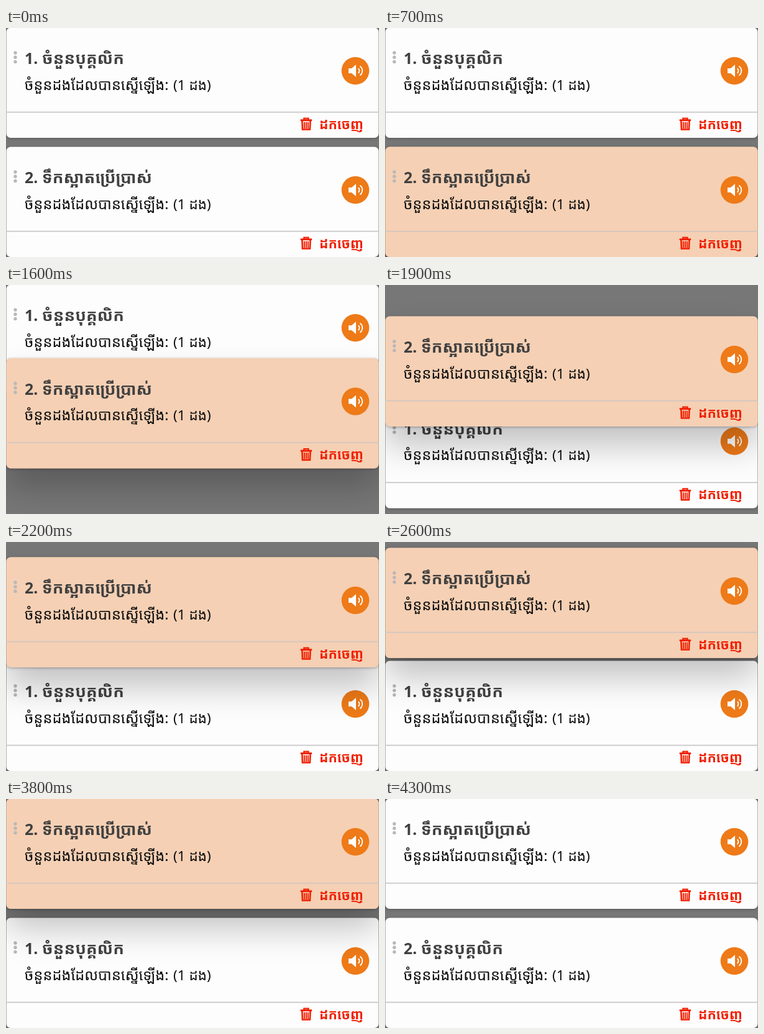
Animation, 600 px wide and 369 px high, one loop 4.4 s. Source, as an HTML page with a canvas:

```html
<!DOCTYPE html>
<html lang="km">
<head>
<meta charset="utf-8">
<title>Reorder cards</title>
<style>
  html, body { margin: 0; width: 100%; height: 100%; overflow: hidden; background: #777; }
  canvas { display: block; width: 600px; height: 369px; }
</style>
</head>
<body>
<canvas id="stage"></canvas>
<script>
const W = 600, H = 369, LOOP = 4400, STEP = 100;
const CARD_H = 177, SLOT = 192;
const LIFT = 700, SWAP = 1722, SWAP_TIME = 250, DROP = 3900;
const STAFF = 'ចំនួនបុគ្គលិក', WATER = 'ទឹកស្អាតប្រើប្រាស់';
const FONT = '"Noto Sans", "Noto Sans Khmer", sans-serif';
const RED = '#f01f00', ORANGE = '#ee7a18', DARK = '#404040', INK = '#0e0e0e';

// Pointer path of the dragged card: [time, top edge]
const path = [[1150, 192], [1400, 165], [1720, 88], [1900, 51], [2200, 25], [2600, 10], [3200, 0]];

const canvas = document.getElementById('stage');
const ctx = canvas.getContext('2d');
const dpr = window.devicePixelRatio || 1;
canvas.width = Math.round(W * dpr);
canvas.height = Math.round(H * dpr);

function slopeAt(i) {
  if (i === 0 || i === path.length - 1) return 0;
  const [a, b, c] = [path[i - 1], path[i], path[i + 1]];
  const before = (b[1] - a[1]) / (b[0] - a[0]);
  const after = (c[1] - b[1]) / (c[0] - b[0]);
  return 2 * before * after / (before + after);
}

function dragY(t) {
  if (t <= path[0][0]) return path[0][1];
  const i = path.findIndex(p => p[0] >= t);
  if (i < 0) return path[path.length - 1][1];
  const [t0, y0] = path[i - 1], [t1, y1] = path[i];
  const d = t1 - t0, u = (t - t0) / d, u2 = u * u, u3 = u2 * u;
  return y0 * (2 * u3 - 3 * u2 + 1) + y1 * (3 * u2 - 2 * u3)
    + d * slopeAt(i - 1) * (u3 - 2 * u2 + u) + d * slopeAt(i) * (u3 - u2);
}

// cubic-bezier(0, 0, .2, 1)
function easeOut(x) {
  if (x <= 0) return 0;
  if (x >= 1) return 1;
  let lo = 0, hi = 1;
  for (let i = 0; i < 24; i++) {
    const s = (lo + hi) / 2;
    if (0.6 * (1 - s) * s * s + s * s * s < x) lo = s; else hi = s;
  }
  return 3 * (1 - lo) * lo * lo + lo * lo * lo;
}

function text(str, x, y, size, color, weight = 400) {
  ctx.font = `${weight} ${size}px ${FONT}`;
  ctx.fillStyle = color;
  ctx.fillText(str, x, y);
}

function disc(x, y, r, color) {
  ctx.fillStyle = color;
  ctx.beginPath();
  ctx.arc(x, y, r, 0, Math.PI * 2);
  ctx.fill();
}

function panel(color, shadow, offset, blur) {
  ctx.save();
  ctx.shadowColor = shadow;
  ctx.shadowOffsetY = offset * dpr;
  ctx.shadowBlur = blur * dpr;
  ctx.fillStyle = color;
  ctx.beginPath();
  ctx.roundRect(0.5, -0.5, W - 1, CARD_H + 0.5, 7);
  ctx.fill();
  ctx.restore();
}

function speaker() {
  disc(562, 69, 22.3, ORANGE);
  ctx.fillStyle = ctx.strokeStyle = '#fff';
  ctx.beginPath();
  ctx.moveTo(551, 65);
  for (const [x, y] of [[556, 65], [563, 59], [563, 79], [556, 73], [551, 73]]) ctx.lineTo(x, y);
  ctx.fill();
  ctx.lineWidth = 1.9;
  for (const r of [4.5, 9.3]) {
    ctx.beginPath();
    ctx.arc(564, 69, r, -0.95, 0.95);
    ctx.stroke();
  }
}

function trash() {
  ctx.strokeStyle = ctx.fillStyle = RED;
  ctx.lineWidth = 2.2;
  ctx.fillRect(473.7, 147.2, 18.4, 2.8);
  ctx.strokeRect(479.3, 145.6, 7.2, 3);
  ctx.lineWidth = 2.6;
  ctx.beginPath();
  ctx.moveTo(476.3, 149);
  ctx.lineTo(476.9, 163.5);
  ctx.lineTo(488.9, 163.5);
  ctx.lineTo(489.5, 149);
  ctx.stroke();
  ctx.lineWidth = 2;
  for (const x of [479.9, 482.9, 485.9]) {
    ctx.beginPath();
    ctx.moveTo(x, 151.5);
    ctx.lineTo(x, 162);
    ctx.stroke();
  }
}

function card(y, number, title, lifted) {
  ctx.save();
  ctx.translate(0, y);
  const fill = lifted ? '#f5d0b4' : '#fefdfe';
  if (lifted) panel(fill, 'rgba(0,0,0,.23)', 32, 54);
  panel(fill, 'rgba(0,0,0,.3)', 1, 4);
  for (const dy of [40, 47.2, 54.4]) disc(15, dy, 2.7, '#b9b7b8');
  text(number + '.', 30, 58, 25, DARK, 700);
  text(title, 58, 58, 26.2, DARK, 700);
  text('ចំនួនដងដែលបានស្នើឡើង:', 30, 99.5, 23.6, INK);
  text('(1 ដង)', 269, 99.5, 22.5, INK);
  ctx.fillStyle = lifted ? '#d3c6c0' : '#c9c8c9';
  ctx.fillRect(0, 134.7, W, 1.8);
  speaker();
  trash();
  text('ដកចេញ', 504, 162.5, 21.2, RED, 700);
  ctx.restore();
}

function draw(t) {
  ctx.setTransform(dpr, 0, 0, dpr, 0, 0);
  ctx.fillStyle = '#777';
  ctx.fillRect(0, 0, W, H);
  const dropped = t >= DROP;
  const lifted = t >= LIFT && !dropped;
  card(SLOT * easeOut((t - SWAP) / SWAP_TIME), dropped ? 2 : 1, STAFF, false);
  card(dragY(t), dropped ? 1 : 2, WATER, lifted);
}

const start = performance.now();
function tick() {
  const t = (performance.now() - start) % LOOP;
  draw(Math.floor(t / STEP) * STEP);
  requestAnimationFrame(tick);
}
tick();
</script>
</body>
</html>
```
